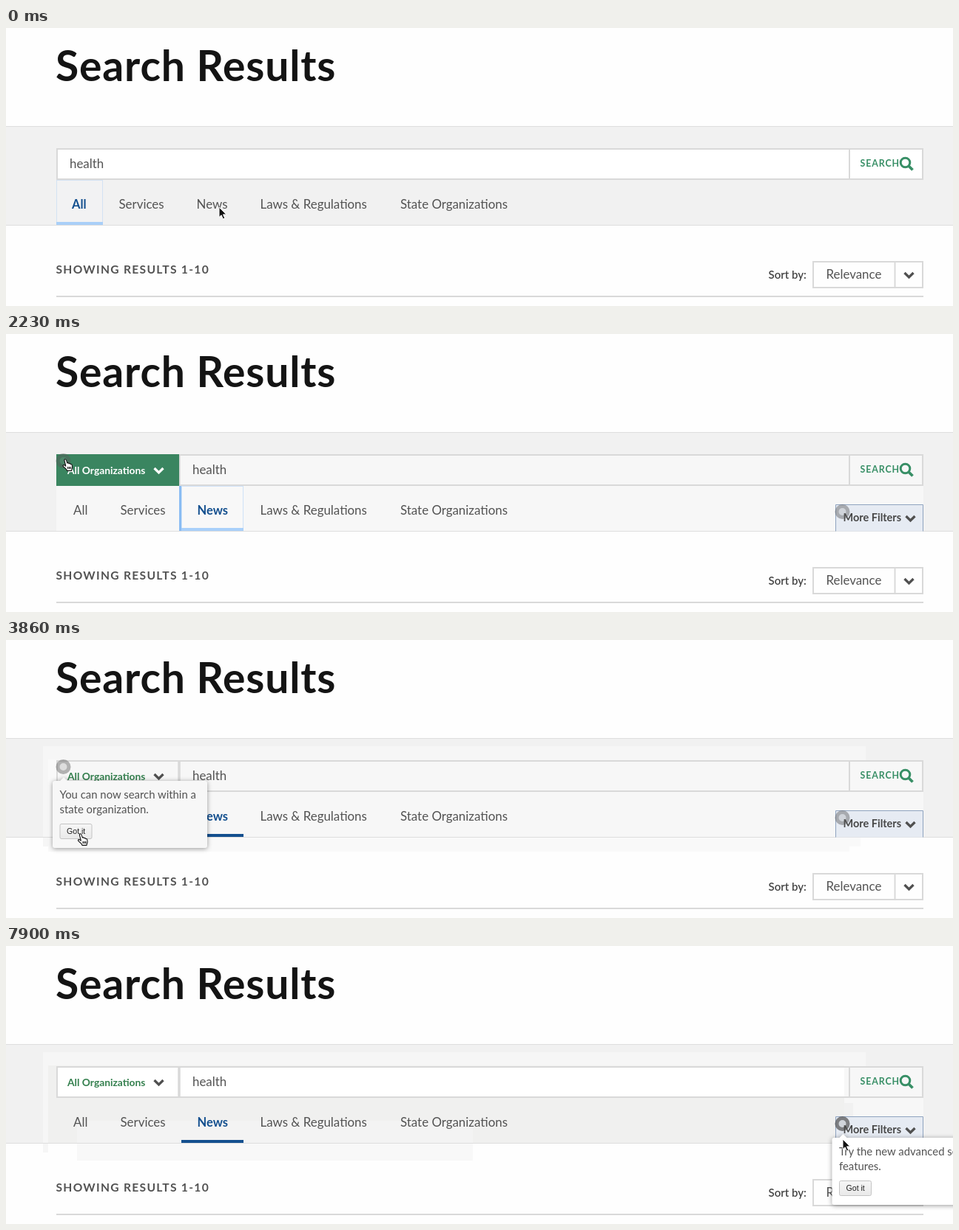
Write an HTML page that moves like this. It is 1280 px wide and 377 px high and loops after 8000 ms.

```html
<!DOCTYPE html>
<html lang="en">
<head>
<meta charset="utf-8">
<title>Search Results</title>
<style>
html, body { margin: 0; width: 100%; height: 100%; overflow: hidden; background: #fefefe; }
svg { display: block; width: 1280px; height: 377px; font: 16.9px Lato, "Open Sans", sans-serif; }
text { fill: #535353; white-space: pre; }
.title { font-size: 57px; font-weight: 700; letter-spacing: .85px; fill: #141414; }
.count { font-size: 15.6px; font-weight: 700; letter-spacing: 1.3px; }
.sort { font-size: 15px; font-weight: 600; fill: #444; }
.go { font-size: 12.4px; font-weight: 700; letter-spacing: .9px; fill: #388f66; }
.org { font-size: 13.8px; font-weight: 700; fill: #35804f; }
.more { font-size: 14.5px; font-weight: 700; fill: #484848; }
.on { font-size: 16.5px; font-weight: 700; fill: #14508f; }
.tip text { font-size: 14.9px; }
.tip .btn { font: 10.6px Arial, "Liberation Sans", sans-serif; fill: #222; }
.line { fill: none; stroke: #d9d9d9; stroke-width: 2; }
.chev { fill: none; stroke: #505050; stroke-width: 3.3; }
.dot circle:first-child { fill: rgba(136,136,136,.24); }
.dot circle:last-child { fill: none; stroke: rgba(60,60,60,.27); stroke-width: 5; }
.dot.hover circle:last-child { stroke: rgba(60,60,60,.57); }
.pulse { fill: none; stroke: rgb(146,146,146); stroke-opacity: .36; }
.box { filter: drop-shadow(0 1px 3px rgba(0,0,0,.4)); }
</style>
</head>
<body>
<svg viewBox="0 0 1280 377">
  <defs>
    <path id="chevron" d="M-6 -3L0 3L6 -3"/>
    <linearGradient id="face" x2="0" y2="1"><stop stop-color="#f6f6f6"/><stop offset="1" stop-color="#e9e9e9"/></linearGradient>
  </defs>

  <text class="title" x="67" y="72">Search Results</text>
  <rect y="133" width="1280" height="135" fill="#dedede"/>
  <rect y="134" width="1280" height="133" fill="#f1f1f1"/>

  <!-- panel shading -->
  <rect data-show="0-900" x="69" y="164" width="1170" height="41" fill="#fff"/>
  <path data-show="3270-8000" d="M50 144H1162V163H57V280H50Z" fill="#f6f6f6"/>
  <path data-show="3270-5360" d="M57 162H68V268H1155V280H1140V287H57Z" fill="#f9f9f9"/>
  <rect data-show="900-5360" x="68" y="163" width="1172" height="104" fill="#f7f7f7"/>
  <g data-show="5360-8000">
    <path d="M57 162H1133V267H57Z" fill="#f0f0ef"/>
    <path d="M1133 163H1240V232H1158V267H1145V213H1133Z" fill="#f7f7f7"/>
    <rect x="68" y="164" width="1065" height="41" fill="#fff"/>
    <rect x="96" y="237" width="535" height="30" fill="#f3f3f3"/>
    <path d="M96 268H631V291H96ZM1145 268H1156V280H1145Z" fill="#f8f8f8"/>
  </g>
  <path data-show="900-8000" d="M0 267.5H1280" stroke="#dedede"/>

  <!-- search bar -->
  <path class="line" d="M69 164H1239V205H69ZM1140 164V205"/>
  <text class="go" x="1154.5" y="188">SEARCH</text>
  <g fill="none" stroke="#388f66" stroke-width="3"><circle cx="1215.5" cy="182.5" r="6.3"/><path d="M1220 187L1225.5 192.5" stroke-width="3.8"/></g>
  <text data-show="0-900" x="86" y="190">health</text>
  <g data-show="900-8000">
    <path class="line" d="M234 164V205" style="stroke-width:3.5"/>
    <text x="252" y="190">health</text>
    <g data-show="0-1934,2380-8000">
      <text class="org" x="83" y="190">All Organizations</text>
      <use href="#chevron" class="chev" x="206.5" y="185"/>
    </g>
    <g data-show="1934-2380">
      <rect x="68" y="163" width="166" height="43" fill="#3a8560"/>
      <text class="org" x="83" y="190" style="fill:#fff">All Organizations</text>
      <use href="#chevron" class="chev" x="206.5" y="185" style="stroke:#fff"/>
    </g>
  </g>

  <!-- tabs -->
  <g data-show="0-600">
    <rect x="68.5" y="206.5" width="62" height="60" fill="#f2f2f3" stroke="#d3e2f3"/>
    <rect x="68" y="263" width="63" height="4" fill="#a9cff8"/>
    <text class="on" x="89" y="245">All</text>
    <text x="152.5" y="245">Services</text>
    <text x="257.5" y="245">News</text>
  </g>
  <g data-show="600-8000">
    <text x="91" y="245">All</text>
    <text x="154.5" y="245">Services</text>
    <g data-show="0-2380">
      <rect x="237.5" y="206.5" width="83" height="60" fill="#f8f8f8" stroke="#cfe2f8"/>
      <rect x="234" y="206" width="3" height="61" fill="#8abcf3"/>
      <rect x="237" y="263" width="84" height="4" fill="#a9d0fa"/>
    </g>
    <rect data-show="2380-8000" x="237" y="263" width="84" height="4" fill="#14508f"/>
    <text class="on" x="258.5" y="245">News</text>
  </g>
  <text x="343.5" y="245">Laws &amp; Regulations</text>
  <text x="533" y="245">State Organizations</text>
  <g data-show="900-8000">
    <path d="M1121.5 267.5V231.5H1239.5V267.5" fill="#e6ebf3" stroke="#8fa3bf"/>
    <text class="more" x="1131.5" y="254">More Filters</text>
    <use href="#chevron" class="chev" x="1222.5" y="250"/>
  </g>

  <!-- result header -->
  <text class="count" x="67.5" y="333">SHOWING RESULTS 1-10</text>
  <text class="sort" x="1030.5" y="340">Sort by:</text>
  <path class="line" d="M1091 317H1239V352H1091ZM1201.5 317V352M68 364H1240"/>
  <text x="1108.5" y="340">Relevance</text>
  <use href="#chevron" class="chev" x="1220.5" y="335"/>

  <!-- hints -->
  <g data-show="900-5060" transform="translate(77.5 172)">
    <circle class="pulse"/>
    <g class="dot" data-hover="2380-2970"><circle r="10"/><circle r="7.5"/></g>
  </g>
  <g data-show="900-8000" transform="translate(1130.5 241)">
    <circle class="pulse"/>
    <g class="dot" data-hover="5960-8000"><circle r="10"/><circle r="7.5"/></g>
  </g>
  <g id="tips"></g>

  <g id="cursor">
    <path id="arrow" d="M0 0V13.6L3.1 10.8L5.4 16L7.8 15L5.5 9.9H9.8Z" fill="#111" stroke="#fff"/>
    <path id="hand" d="M4.6 9L3 3Q2.6 1 3.8 .8Q5 .6 5.5 2.2L6.8 6Q8.5 5 9 6.8Q10.6 6 11.2 7.6Q13 7.2 13.3 9L13.6 12L12.4 16.4H6.6L5.5 14.4L1.4 10.6Q.4 9 1.8 8.6Q3 8.4 4.6 10ZM7.6 11V14M9.5 11V14M11.3 11V14" fill="#fff" stroke="#111" stroke-width="1.1"/>
  </g>
</svg>
<script>
const LOOP = 8000;
const $ = (q) => [...document.querySelectorAll(q)];

const tip = (show, x, y, fill, lines) => `
  <g class="tip" data-show="${show}" transform="translate(${x} ${y})">
    <path class="box" d="M3 0H10L15 -5L20 0H206Q209 0 209 3V88Q209 91 206 91H3Q0 91 0 88V3Q0 0 3 0Z" fill="${fill}"/>
    ${lines.map((s, i) => `<text x="9.5" y="${24 + 20 * i}">${s}</text>`).join("")}
    <rect x="10" y="58.5" width="43" height="20" rx="2" fill="url(#face)" stroke="#c4c4c4"/>
    <text class="btn" x="19" y="72">Got it</text>
  </g>`;
document.getElementById("tips").innerHTML =
  tip("2670-5060", 63, 191, "#f7f7f7", ["You can now search within a", "state organization."]) +
  tip("7150-8000", 1116.5, 260, "#fff", ["Try the new advanced search", "features."]);

// Pointer poses: time, shape, x, y; each holds until the next.
const poses = [
  [0, "arrow", 288, 243], [300, "hand", 275, 243], [1640, "hand", 213, 231.5],
  [1787, "hand", 146, 206], [1934, "hand", 102, 182], [2081, "hand", 80, 171], [2230, "hand", 76, 169],
  [2970, "arrow", 84, 196], [3120, "arrow", 91, 222], [3270, "arrow", 97, 243],
  [3420, "hand", 95, 257], [3570, "hand", 96.5, 262],
  [5060, "arrow", 101, 264], [5360, "arrow", 150, 272], [5510, "hand", 612, 238], [5660, "arrow", 955, 232],
  [5810, "arrow", 1098, 228], [5960, "hand", 1122, 241], [6110, "hand", 1124, 244],
  [7900, "arrow", 1131, 262]
];

const spans = (s) => s.split(",").map((r) => r.split("-").map(Number));
const within = (list, t) => list.some(([a, b]) => t >= a && t < b);
const shown = $("[data-show]").map((el) => [el, spans(el.dataset.show)]);
const hovers = $("[data-hover]").map((el) => [el, spans(el.dataset.hover)]);
const pulses = $(".pulse");
const [cursor, arrow, hand] = ["cursor", "arrow", "hand"].map((id) => document.getElementById(id));

// Expanding ring: a 3 s beat, drawn in steps of about 150 ms.
function pulse(t) {
  if (t < 2370 || (t >= 3860 && t < 5360) || t >= 7150) return [0, 0];
  const step = 2370 + Math.floor((t - 2370) / 149) * 149;
  const p = ((Math.min(step, 6465) - 900) % 3000) / 3000;
  const late = p >= .75;
  const e = 1 - Math.pow(1 - Math.max(0, p - (late ? .75 : .5)) * 4, 1.7);
  return late ? [.5 + .5 * e, .5 - .5 * e] : [.1 + .4 * e, .3 + .2 * e];
}

function draw(t) {
  for (const [el, s] of shown) el.style.display = within(s, t) ? "" : "none";
  for (const [el, s] of hovers) el.classList.toggle("hover", within(s, t));
  const [scale, opacity] = pulse(t);
  for (const c of pulses) {
    c.setAttribute("r", 30 * scale);
    c.setAttribute("stroke-width", 10 * scale);
    c.setAttribute("opacity", opacity);
  }
  const [, shape, x, y] = poses.filter((p) => p[0] <= t).pop();
  cursor.setAttribute("transform", `translate(${x} ${y})`);
  arrow.style.display = shape === "arrow" ? "" : "none";
  hand.style.display = shape === "hand" ? "" : "none";
}

const start = performance.now();
function tick() {
  draw((performance.now() - start) % LOOP);
  requestAnimationFrame(tick);
}
tick();
</script>
</body>
</html>
```
